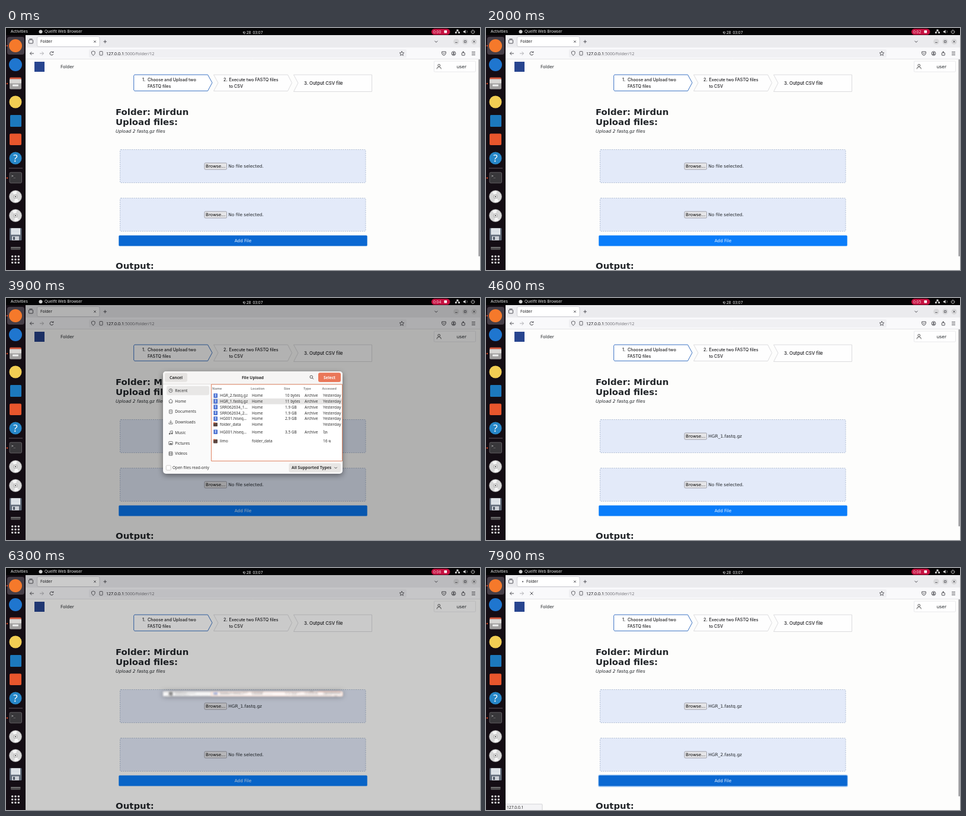
Animation of 800x409 px, one loop 8000 ms. Source, as an HTML page with a canvas:

```html
<!DOCTYPE html>
<html lang="en">
<head>
<meta charset="utf-8">
<title>Folder upload</title>
<style>
html, body { margin: 0; width: 100%; height: 100%; overflow: hidden; background: #fdfdfc; }
canvas { display: block; width: 800px; height: 409px; }
</style>
</head>
<body>
<canvas id="stage" width="800" height="409"></canvas>
<script>
const g = document.getElementById('stage').getContext('2d');
const LOOP = 8000;
const UI = '"Noto Sans", "Open Sans", sans-serif';
const WEB = '"DejaVu Sans", sans-serif';
const STEP = 'Inter, sans-serif';
const INK = '#212529';

// ---- helpers ----
const ramp = (t, a, b) => Math.min(1, Math.max(0, (t - a) / (b - a)));
const mix = (a, b, k) => `rgb(${a.map((v, i) => Math.round(v + (b[i] - v) * k))})`;

function text(s, x, y, size, color = INK, font = UI, style = '', align = 'left') {
  g.font = `${style} ${size}px ${font}`;
  g.fillStyle = color;
  g.textAlign = align;
  g.fillText(s, x, y + size * 0.36);
}
function box(x, y, w, h, fill, r = 0, line, lw = 1) {
  g.beginPath();
  g.roundRect(x, y, w, h, r);
  if (fill) { g.fillStyle = fill; g.fill(); }
  if (line) { g.strokeStyle = line; g.lineWidth = lw; g.stroke(); }
}
function disc(x, y, r, fill, line, lw = 1) {
  g.beginPath();
  g.arc(x, y, r, 0, 7);
  if (fill) { g.fillStyle = fill; g.fill(); }
  if (line) { g.strokeStyle = line; g.lineWidth = lw; g.stroke(); }
}
function path(pts, line, lw = 1, fill, close) {
  g.beginPath();
  pts.forEach(([x, y]) => g.lineTo(x, y));
  if (close || fill) g.closePath();
  if (fill) { g.fillStyle = fill; g.fill(); }
  if (line) { g.strokeStyle = line; g.lineWidth = lw; g.stroke(); }
}
const cross = (x, y, r, c, lw) => {
  path([[x - r, y - r], [x + r, y + r]], c, lw);
  path([[x + r, y - r], [x - r, y + r]], c, lw);
};
const chevron = (x, y, r, c) => path([[x - r, y - r / 2], [x, y + r / 2], [x + r, y - r / 2]], c, 0.9);

// ---- desktop ----
function topBar(t) {
  box(0, 0, 800, 12, '#050506');
  text('Activities', 8, 6, 6.9, '#e8e8e8');
  disc(58.5, 6.2, 3, '#cfcfcf');
  text('Quelfit Web Browser', 65, 6, 6.6, '#e8e8e8');
  text('໑', 399.5, 7.7, 7.4, '#e8e8e8', WEB);
  text('28', 405.7, 7.7, 6.7, '#e8e8e8');
  text('03:07', 416.4, 7.7, 6.7, '#e8e8e8');
  const secs = Math.floor((t + 400) / 1000);
  box(718, 1.2, 31.5, 10.4, '#c50f3f', 5.2);
  text('0:0' + secs, 721, 6.2, 6.7, '#f7dbe2');
  box(739.5, 4, 4.6, 4.6, '#fff', 0.5);
  // network, volume, power
  box(760.5, 2.5, 3, 2.6, '#ddd');
  box(758, 6.7, 2.8, 2.4, '#ddd');
  box(763.2, 6.7, 2.8, 2.4, '#ddd');
  path([[759.4, 7], [759.4, 5.8], [764.6, 5.8], [764.6, 7]], '#ddd', 0.7);
  path([[772, 5], [773.6, 5], [775.6, 3], [775.6, 9.2], [773.6, 7.4], [772, 7.4]], 0, 0, '#ddd');
  g.beginPath(); g.arc(775.6, 6.2, 2.8, -0.9, 0.9); g.strokeStyle = '#888'; g.lineWidth = 0.8; g.stroke();
  g.beginPath(); g.arc(788, 6.4, 2.8, -0.9, 4.05); g.strokeStyle = '#ddd'; g.lineWidth = 0.9; g.stroke();
  path([[788, 2.6], [788, 6]], '#ddd', 0.9);
}

function cd(y) {
  disc(16, y, 10.5, '#d7d7d7', '#a5a5a5', 0.7);
  g.beginPath(); g.moveTo(16, y); g.arc(16, y, 9.5, -2.2, -1.3); g.fillStyle = '#f5f5f5'; g.fill();
  g.beginPath(); g.moveTo(16, y); g.arc(16, y, 9.5, 0.9, 1.8); g.fill();
  disc(16, y, 3.2, '#efefef', '#999', 0.8);
  disc(16, y, 1.2, '#666');
}
function dock() {
  box(0, 12, 33, 397, '#140d14');
  box(2, 15, 29, 30, '#463e47', 4);
  disc(16, 30, 11, '#f5792b');
  disc(16, 62, 11, '#1f76cf');
  // files
  box(6, 83.5, 20, 10, '#d2573a', 2);
  box(6, 86.5, 20, 17, '#a2a0a0', 2);
  box(6, 86.5, 20, 7, '#d9d7d5', 1);
  box(11, 95.5, 10, 3, '#f0f0f0', 1);
  disc(16, 125, 10.5, '#f3ce53');
  box(7, 147, 19, 20, '#1c78bd', 1.5);
  box(6, 178.5, 20, 19.5, '#e8562d', 2);
  disc(16, 220, 10.5, '#2787c9');
  text('?', 16, 220, 17, '#fff', UI, '', 'center');
  path([[5, 237], [28, 237]], '#6b646b', 0.9);
  // terminal
  box(6, 244, 20.5, 18, '#38373a', 2, '#6f6d70', 0.8);
  text('>_', 9, 249.5, 6, '#eee', '"DejaVu Sans Mono", monospace');
  cd(285);
  cd(317);
  // floppy
  box(6, 338, 20.5, 21, '#5f6a78', 1.5);
  box(8.5, 338.5, 15.5, 11, '#f0f3f5');
  for (let y = 341; y < 349; y += 2.5) path([[10, y], [22.5, y]], '#9ab', 0.6);
  box(10, 352, 12, 7, '#c9ced4');
  box(12, 353, 3, 5, '#4d5763');
  box(8, 370, 16.5, 5, '#4a484a', 1.5);
  box(8, 370, 16.5, 1.6, '#777', 1);
  for (let i = 0; i < 9; i++) box(9.2 + i % 3 * 5.3, 384.5 + (i / 3 | 0) * 5.3, 3, 3, '#f2f2f2', 0.8);
  for (const y of [30, 94, 253.5]) disc(2, y, 1.2, '#d54a2a');
}

// ---- browser ----
function chrome(t, loading) {
  const c = '#3f3f46';
  box(33, 12, 767, 21, '#ebebee');
  box(38.5, 20, 7, 6, null, 1, c, 0.9);
  path([[39.5, 18.6], [44.5, 18.6]], c, 0.9);
  box(52.5, 14.5, 105.5, 17, '#fff', 2.5, '#c6c6cc', 0.8);
  if (loading) disc(62 + 2.5 * Math.sin((t - 7900) / 600 * Math.PI * 2), 23, 1.2, '#77777d');
  text('Folder', loading ? 68 : 58, 23, 6.7, '#17171a');
  cross(150, 23, 1.8, c, 0.8);
  path([[164.5, 23], [170, 23]], c, 0.9);
  path([[167.2, 20.3], [167.2, 25.7]], c, 0.9);
  chevron(726, 23, 2.5, c);
  for (const x of [760, 775, 790]) disc(x, 23, 4.8, '#d8d8da');
  path([[758.2, 24.5], [761.8, 24.5]], c, 0.8);
  box(773.4, 21.4, 3.2, 3.2, null, 0, c, 0.8);
  cross(790, 23, 1.6, c, 0.8);

  box(33, 33, 767, 19.5, '#f9f9fb');
  path([[33, 52.5], [800, 52.5]], '#dfdfe2', 0.8);
  path([[47, 43], [40.5, 43]], c, 0.9);
  path([[43.3, 40.2], [40.5, 43], [43.3, 45.8]], c, 0.9);
  path([[57, 43], [63.5, 43]], '#a5a5aa', 0.9);
  path([[60.7, 40.2], [63.5, 43], [60.7, 45.8]], '#a5a5aa', 0.9);
  if (loading) cross(77, 43, 2.5, c, 0.9);
  else {
    g.beginPath(); g.arc(77, 43, 2.9, 0.3, 5.4); g.strokeStyle = c; g.lineWidth = 0.9; g.stroke();
    path([[77.5, 41.8], [80.3, 41.8], [80.3, 39]], 0, 0, c);
  }
  box(140, 36, 536, 14, '#f0f0f3', 2);
  path([[147.3, 39], [150.2, 40.2], [150, 43.5], [147.3, 46.6], [144.6, 43.5], [144.4, 40.2]], c, 0.8, null, true);
  box(158, 39.5, 5, 6.5, null, 0.8, c, 0.8);
  text('127.0.0.1', 169, 43, 7.1, '#17171a');
  const w = g.measureText('127.0.0.1').width;
  text(':5000/folder/12', 169 + w, 43, 7.1, '#76767c');
  path(Array.from({ length: 10 }, (_, i) => {
    const a = i * Math.PI / 5 - Math.PI / 2, r = i % 2 ? 1.8 : 4;
    return [668 + r * Math.cos(a), 43.2 + r * Math.sin(a)];
  }), c, 0.8, null, true);
  path([[735.7, 40], [742.3, 40], [742.3, 43], [741, 45.3], [739, 46.2], [737, 45.3], [735.7, 43]], c, 0.9, null, true);
  chevron(739, 42.8, 1.6, c);
  disc(755.5, 43, 3.4, null, c, 0.9);
  disc(755.5, 42, 1.2, c);
  box(753.6, 43.7, 3.8, 1.6, c, 0.8);
  box(769.3, 41.8, 5, 4.4, null, 0.6, c, 0.9);
  box(770.6, 39.4, 2.2, 2.2, c, 1);
  for (const y of [40.5, 43, 45.5]) path([[786, y], [792, y]], c, 0.8);
}

function stepper() {
  const gray = '#dcdcde';
  path([[350.5, 79], [475.5, 79], [482.5, 92.7], [475.5, 106.5], [350.5, 106.5], [358, 92.7]], gray, 1, '#fefefe');
  path([[485.5, 79], [617.5, 79], [617.5, 107.5], [485.5, 107.5], [493, 93]], gray, 1, '#fefefe');
  path([[217, 79], [340.5, 79], [348, 92.5], [340.5, 106.3], [217, 106.3], [215.7, 105], [215.7, 80.3]], '#3a72c4', 1, '#fff');
  const put = (s, x, y, size = 7.15) => text(s, x, y, size, '#1d1d20', STEP, '500');
  put('1.', 230, 87.8);
  put('Choose and Upload two', 239, 87.8);
  put('FASTQ files', 239, 98);
  put('2.', 367, 87.8);
  put('Execute two FASTQ files', 376.5, 87.8);
  put('to CSV', 376.5, 98);
  put('3. Output CSV file', 503, 93.3, 7.7);
}

function picker(y, label) {
  g.setLineDash([2, 1.6]);
  box(192.5, y, 414.5, 56, '#e3eaf9', 1.5, '#a9b7cf', 0.9);
  g.setLineDash([]);
  box(335, y + 22.6, 37.5, 11, '#e5e5e8', 1.5, '#8f8f98', 0.8);
  text('Browse…', 353.8, y + 28, 7.2, '#000', WEB, '', 'center');
  text(label, 375.3, y + 28, 7.4, INK, WEB);
}

function page(t, loading, active) {
  box(33, 52.5, 767, 357, '#fdfdfc');
  box(48, 57, 17, 17, '#28458f');
  text('Folder', 92, 65.3, 7.4, INK, WEB);
  box(722.5, 56, 70, 18, '#fefefe', 1, '#e6e6e8', 0.9);
  disc(730.8, 63.2, 1.9, null, '#333', 0.8);
  g.beginPath(); g.arc(730.8, 69.3, 3.6, Math.PI, 0); g.stroke();
  text('user', 760.5, 65, 7.6, INK, WEB);
  stepper();
  text('Folder: Mirdun', 185, 141.7, 14.9, INK, WEB, 'bold');
  text('Upload files:', 185, 158.4, 14.9, INK, WEB, 'bold');
  text('Upload 2 fastq.gz files', 185, 174, 7.5, INK, WEB, 'italic');
  picker(205.5, t >= 4400 ? 'HGR_1.fastq.gz' : 'No file selected.');
  picker(287.5, t >= 6450 ? 'HGR_2.fastq.gz' : 'No file selected.');
  const hover = 1 - ramp(t, 500, 650) + ramp(t, 6650, 6800);
  if (loading) box(189, 349.3, 422, 21, '#a9cdf5', 3);
  box(190.3, 350.6, 419.4, 18, mix([10, 125, 250], [10, 104, 210], hover), 1.5);
  text('Add File', 400, 359.8, 7.3, '#eef5ff', WEB, '', 'center');
  text('Output:', 185, 402, 14.9, INK, WEB, 'bold');
  if (active) box(797.8, 53, 1.6, 333, '#6e6e73', 0.8);
  if (loading) {
    box(32.5, 399, 62.5, 11, '#f4f4f6', 1, '#c9c9cd', 0.8);
    text('127.0.0.1', 35, 404.3, 6.7, '#222');
  }
}

// ---- file dialog ----
const PLACES = ['Recent', 'Home', 'Documents', 'Downloads', 'Music', 'Pictures', 'Videos'];
const FILES = [
  ['HGR_2.fastq.gz', 'Home', '10 bytes', 'Yesterday', 165],
  ['HGR_1.fastq.gz', 'Home', '11 bytes', 'Yesterday', 174.6],
  ['SRR062634_1…', 'Home', '1.9 GB', 'Yesterday', 184.4],
  ['SRR062634_2…', 'Home', '1.9 GB', 'Yesterday', 194.2],
  ['HG001.hiseq…', 'Home', '2.9 GB', 'Yesterday', 204],
  ['folder_data', 'Home', '', 'Yesterday', 213.7],
  ['HG001.hiseq…', 'Home', '3.5 GB', 'ໄກ', 226.3],
  ['limo', 'folder_data', '', '16 ໑', 242]
];

function placeIcon(i, y) {
  const c = '#5a5a5a', x = 278;
  if (i === 0) {
    disc(x, y, 3, null, c, 0.8);
    path([[x, y - 2], [x, y], [x + 1.6, y]], c, 0.8);
  } else if (i === 1) {
    path([[x - 3.6, y], [x, y - 3.4], [x + 3.6, y]], c, 0.9);
    path([[x - 2.4, y], [x - 2.4, y + 3], [x + 2.4, y + 3], [x + 2.4, y]], c, 0.9);
  } else if (i === 2) {
    box(x - 2.5, y - 3, 5, 6.2, null, 0.5, c, 0.8);
    for (const d of [-1, 0.8]) path([[x - 1.4, y + d], [x + 1.4, y + d]], c, 0.6);
  } else if (i === 3) {
    path([[x, y - 3.2], [x, y + 1.4]], c, 0.9);
    chevron(x, y + 0.6, 2, c);
    path([[x - 3, y + 1], [x - 3, y + 3.2], [x + 3, y + 3.2], [x + 3, y + 1]], c, 0.8);
  } else if (i === 4) {
    disc(x - 1.8, y + 2, 1.3, c);
    disc(x + 2, y + 1.4, 1.3, c);
    path([[x - 0.8, y + 2], [x - 0.8, y - 2.4], [x + 3, y - 3], [x + 3, y + 1.4]], c, 0.8);
  } else if (i === 5) {
    box(x - 3.2, y - 2.7, 6.4, 5.4, null, 0.6, c, 0.8);
    path([[x - 2.6, y + 2.2], [x - 0.6, y - 0.6], [x + 0.8, y + 0.8], [x + 1.8, y], [x + 2.8, y + 2.2]], 0, 0, c);
  } else {
    box(x - 3, y - 3, 6, 6, null, 0.4, c, 0.8);
    for (const d of [-1.4, 1.4]) path([[x + d, y - 3], [x + d, y + 3]], c, 0.7);
    path([[x - 3, y], [x + 3, y]], c, 0.6);
  }
}

function dialog(scale, row, enable) {
  g.save();
  // a squashed window smears
  if (scale < 1) g.filter = `blur(${1.4 * (1 - scale)}px)`;
  g.translate(0, 213);
  g.scale(1, scale);
  g.translate(0, -213);
  g.shadowColor = 'rgba(0,0,0,.42)';
  g.shadowBlur = 10;
  g.shadowOffsetY = 3 * scale;
  box(265, 124, 303, 173, '#fafafa', 5);
  g.shadowColor = 'transparent';
  box(265, 124, 303, 21.5, '#f6f5f4', [5, 5, 0, 0]);
  path([[265, 145.5], [568, 145.5]], '#dcdad8', 0.8);
  box(268, 126.7, 38, 15, '#e5e3e1', 3);
  text('Cancel', 287, 134.2, 6.7, '#2d2d2d', UI, 'bold', 'center');
  text('File Upload', 416.5, 134.2, 6.7, '#2d2d2d', UI, 'bold', 'center');
  disc(515.3, 133.4, 2.3, null, '#444', 0.9);
  path([[517, 135.2], [519, 137.2]], '#444', 1);
  box(527, 126.3, 38, 15.7, mix([241, 151, 127], [228, 88, 52], enable), 3);
  text('Select', 546, 134.2, 6.7, '#fff', UI, 'bold', 'center');

  box(271, 148.8, 72, 15.4, '#e8e7e6', 3);
  PLACES.forEach((s, i) => {
    const y = 156.5 + i * 17.75;
    placeIcon(i, y);
    text(s, 285.3, y, 6.6, '#333');
  });

  box(346.5, 146, 221, 129.5, '#fff', 0, '#e08463', 1);
  const heads = { Name: 348, Location: 413, Size: 469, Type: 502, Accessed: 533.5 };
  for (const s in heads) text(s, heads[s], 152.6, 5.4, '#858585', UI, 'bold');
  if (row >= 0) box(347, FILES[row][4] - 4.9, 220, 9.8, '#e5e4e3');
  FILES.forEach(([name, place, size, date, y]) => {
    if (size) {
      box(350.4, y - 3.8, 6.6, 7.6, '#4a6fd0', 0.8);
      box(352.8, y - 3, 1.8, 5, '#b9cbf5');
    } else {
      box(350, y - 3, 7, 6.4, '#5b4640', 0.8);
      box(350, y - 3.4, 3.4, 1.6, '#c9603f', 0.5);
    }
    text(name, 361, y, 6.65, '#333');
    text(place, 415, y, 6.5, '#333');
    if (size) {
      text(size, 471, y, 6.5, '#333');
      text('Archive', 504, y, 6.5, '#333');
    }
    text(date, 535, y, 6.65, '#333', UI.replace('sans-serif', WEB));
  });

  box(270.3, 283, 8, 8, '#fff', 1.5, '#c9c7c5', 0.9);
  text('Open files read-only', 281, 287, 6.55, '#333');
  box(477.5, 279.3, 87.5, 15.4, '#e8e6e4', 3);
  text('All Supported Types', 482, 287, 6.8, '#333', UI, 'bold');
  chevron(556.5, 287, 2.2, '#444');
  g.restore();
}

// open, pick, close times and picked row for each visit to the dialog
const VISITS = [
  { open: 2200, pick: 3890, close: 4180, row: 1 },
  { open: 5142, pick: 5690, close: 6222, row: 0 }
];
const dimOf = (v, t) => Math.min(ramp(t, v.open, v.open + 500), 1 - ramp(t, v.close, v.close + 250));
const easeOut = p => 1 - (1 - p) ** 2;

function draw(t) {
  const loading = t >= 7600;
  const visit = VISITS.find(v => dimOf(v, t) > 0);
  g.clearRect(0, 0, 800, 409);
  page(t, loading, !visit);
  chrome(t, loading);
  if (visit) {
    const { open, pick, close, row } = visit;
    box(33, 12, 767, 397, `rgba(0,0,0,${0.3 * dimOf(visit, t)})`);
    const scale = easeOut(ramp(t, open, open + 100)) - easeOut(ramp(t, close, close + 100));
    const picked = t >= pick;
    if (scale > 0) dialog(scale, picked ? row : -1, picked ? ramp(t, pick - 100, pick + 120) : 0);
  }
  dock();
  topBar(t);
}

function tick(now) {
  draw(now % LOOP);
  requestAnimationFrame(tick);
}
requestAnimationFrame(tick);
</script>
</body>
</html>
```
